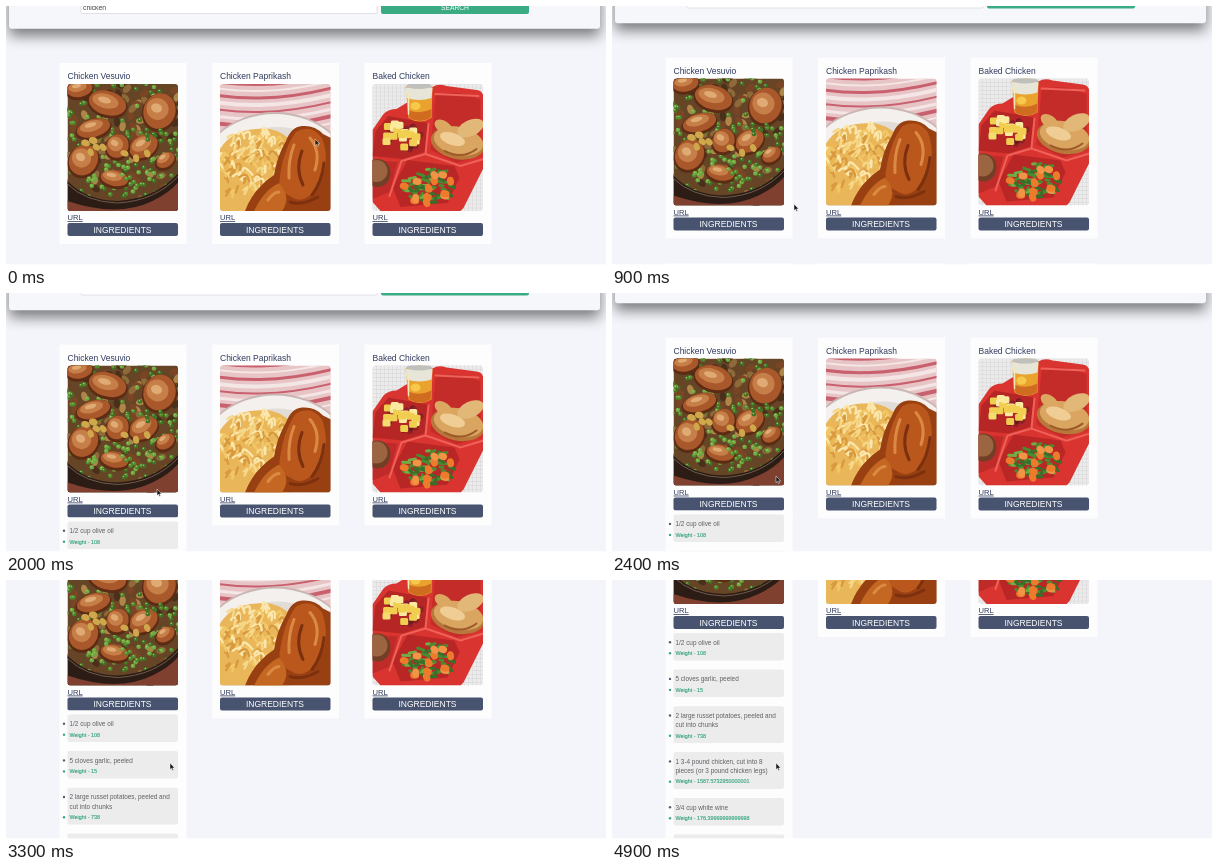
An HTML page that plays this animation: 600x259 px, repeating every 5200 ms.

```html
<!DOCTYPE html>
<html lang="en">
<head>
<meta charset="utf-8">
<title>Recipe search</title>
<style>
  html, body { margin: 0; height: 100%; overflow: hidden; background: #f4f5fa; }
  svg { display: block; width: 100vw; height: 100vh; font-family: "Liberation Sans", Arial, sans-serif; }
</style>
</head>
<body>
<svg id="stage" viewBox="0 0 600 259" xmlns="http://www.w3.org/2000/svg"></svg>
<script>
let seed = 7;
const rnd = () => (seed = (seed * 16807) % 2147483647) / 2147483647;
const pick = list => list[Math.floor(rnd() * list.length)];

const rect = (x, y, w, h, fill, r = 0, more = "") =>
  `<rect x="${x}" y="${y}" width="${w}" height="${h}" rx="${r}" fill="${fill}" ${more}/>`;
const text = (x, y, s, size, fill, more = "") =>
  `<text x="${x}" y="${y}" font-size="${size}" fill="${fill}" ${more}>${s}</text>`;
const path = (d, fill, more = "") => `<path d="${d}" fill="${fill}" ${more}/>`;
const line = (d, color, width) => path(d, "none", `stroke="${color}" stroke-width="${width}" stroke-linecap="round"`);
const oval = (x, y, rx, ry, fill, turn = 0) =>
  `<ellipse rx="${rx}" ry="${ry}" fill="${fill}" transform="translate(${x} ${y}) rotate(${turn})"/>`;

// n shapes spread at random over an ellipse
function scatter(n, cx, cy, rx, ry, shape) {
  let out = "";
  while (n--) {
    const a = rnd() * 2 * Math.PI, d = Math.sqrt(rnd());
    out += shape((cx + rx * d * Math.cos(a)).toFixed(1), (cy + ry * d * Math.sin(a)).toFixed(1));
  }
  return out;
}

const pea = (x, y) => oval(x, y, 2.3, 2.2, pick(["#4f8a2b", "#6fa83e", "#3f7223"])) + oval(x - .6, y - .7, .8, .7, "#a3cc72");
const meat = ([x, y, rx, ry, turn]) =>
  oval(x, y + 1.5, rx + 1.5, ry + 1.5, "#5b2b14", turn) + oval(x, y, rx, ry, "#a9582b", turn) +
  oval(x - 2, y - 2, rx * .7, ry * .6, "#c67f48", turn) + oval(x - 3, y - 3, rx * .35, ry * .25, "#e0aa74", turn);

function skillet() {
  const pieces = [[40, 19, 19, 12, 15], [92, 27, 16, 18, 20], [26, 44, 17, 9, -15], [16, 76, 14, 16, 35],
    [76, 62, 15, 11, -30], [50, 62, 11, 12, 30], [12, 5, 13, 8, -10], [47, 94, 14, 8, 10], [98, 76, 10, 7, -35]];
  return rect(0, 0, 111, 127, "#664526") +
    scatter(110, 55, 55, 75, 78, (x, y) => oval(x, y, 5, 3.2, pick(["#8e6a3a", "#ad8648", "#49301b", "#7a4524"]), rnd() * 180)) +
    scatter(170, 55, 56, 66, 66, pea) +
    pieces.map(meat).join("") +
    scatter(10, 45, 66, 38, 12, (x, y) => oval(x, y, 4, 3, "#d0a84c", rnd() * 90)) +
    scatter(18, 60, 92, 40, 10, pea) + scatter(9, 88, 50, 15, 7, pea) +
    path("M0 97Q18 116 50 117Q88 115 111 89V127H0Z", "#2b1c16") +
    path("M0 117Q50 134 85 117Q102 109 111 98V127H0Z", "#80402f") +
    line("M0 100Q18 118 50 119Q88 117 111 92", "#8f7461", .7);
}

function noodles() {
  let out = rect(0, 0, 111, 127, "#e7c4c6");
  for (let i = 0; i < 10; i++)
    out += line(`M-5 ${i * 7 - 17}Q50 ${i * 7 - 8} 116 ${i * 7 - 25}`, i % 2 ? "#f4e6e4" : "#c9606d", i % 3 + 2);
  out += oval(55, 102, 82, 74, "#c9b5b2") + oval(55, 103, 81, 73, "#f3f0ed") + oval(57, 107, 68, 64, "#e2dcd6") +
    path("M0 65Q12 46 36 45Q58 42 72 58V127H0Z", "#e9b75a");
  out += scatter(110, 32, 82, 38, 38, (x, y) =>
    line(`M${x} ${y}q${(rnd() * 10).toFixed(1)} -7 ${(rnd() * 12 - 2).toFixed(1)} 4`, pick(["#f6d88a", "#d99a3d", "#f1c768", "#fbe6ac"]), 2.4));
  return out + path("M25 127Q33 105 54 91Q57 72 66 57Q71 43 82 42Q95 41 103 50L111 54V127Z", "#984012") +
    path("M60 92Q64 64 76 48Q91 39 102 54Q111 78 99 101Q84 123 70 112Q57 106 60 92Z", "#b9571d") +
    path("M34 127Q44 106 59 99Q72 113 62 127Z", "#c46723") +
    line("M74 61Q68 76 69 94M90 54Q101 67 95 86M48 116Q54 108 59 108", "#db8a43", 3) +
    line("M82 67Q75 85 83 101M104 79Q102 98 92 111M70 118Q82 122 98 113", "#7d300e", 3);
}

function tray() {
  let out = rect(0, 0, 111, 127, "#eceaea");
  for (let i = 0; i < 130; i += 4) out += line(`M0 ${i}H111M${i} 0V127`, "#d9d8da", .6);
  out += path("M0 46L11 30Q16 25 24 25L60 3Q66 -1 74 2L104 6Q111 7 111 14V84L91 124L88 127H8L0 118Z", "#d9342f") +
    path("M3 47L16 32L55 39L52 68L30 75L0 72Z", "#b52624") +
    path("M63 12Q84 4 108 16V72L84 79L58 66Z", "#c42c29") +
    path("M35 76L82 82L87 94L75 119L28 123L20 103Z", "#b82725") +
    path("M0 76L25 78L17 108L0 115Z", "#bf2b29") +
    line("M56 40L53 70L29 77L17 112M53 70L88 82L111 75M63 10L106 12", "#ee625a", 2);
  out += path("M33 3Q47 -4 60 3L59 34Q47 41 36 34Z", "#e9a22e") + path("M33 4Q47 -2 60 4L59 14Q47 18 34 14Z", "#e6e5d8") +
    oval(46.5, 2, 13, 3, "#bfc0bc") + path("M36 26Q47 31 59 25L58 34Q47 40 37 34Z", "#d06c20") +
    oval(43, 22, 5, 4, "#f6c94b") + line("M36 8V30", "#f5e7b6", 1.5);
  out += scatter(20, 28, 54, 22, 14, (x, y) => oval(x, y, 3, 3, pick(["#6b1821", "#8f2027"]))) +
    scatter(18, 27, 53, 23, 13, (x, y) => rect(x - 4, y - 4, 8, 7, pick(["#f5dc70", "#f1ce4f", "#faeaa0"]), 1.5));
  out += oval(85, 59, 27, 16, "#b9783b", 12) + oval(86, 57, 25, 14, "#d9a561", 12) + oval(98, 44, 14, 8, "#e2b878", -25) +
    oval(71, 43, 10, 6, "#dca760", 35) + oval(80, 55, 13, 6, "#efcd95", 18) + line("M72 67Q90 76 104 65", "#9d5b2a", 2);
  out += oval(5, 89, 13, 14, "#713f26") + oval(4, 87, 11, 11, "#9b6541");
  return out +
    scatter(60, 56, 101, 27, 17, (x, y) => line(`M${x} ${y}l${(rnd() * 8).toFixed(1)} ${(rnd() * 5 - 2).toFixed(1)}`, pick(["#4c8a2f", "#70ad43", "#37702a"]), 3)) +
    scatter(13, 53, 103, 27, 17, (x, y) => oval(x, y, 4.5, 3.5, pick(["#ee7a2c", "#f29445"]), rnd() * 90));
}

const navy = "#2f3a5c", slate = "#47536f", green = "#38a583", card = "#fdfdfe";
const columns = [53.5, 206, 358.5];

const recipe = (x, title, photo) =>
  rect(x, 57, 127, 181, card, 1) + text(x + 8, 73, title, 8.5, navy) +
  `<g transform="translate(${x + 8} 78)" clip-path="url(#photo)">${photo}</g>` +
  text(x + 8, 214, "URL", 7.6, navy, 'text-decoration="underline"') +
  rect(x + 8, 217, 110.5, 13, slate, 2) + text(x + 63, 226.7, "INGREDIENTS", 8.5, "#fff", 'text-anchor="middle"');

function ingredients() {
  const items = [
    ["108", "1/2 cup olive oil"], ["15", "5 cloves garlic, peeled"],
    ["738", "2 large russet potatoes, peeled and", "cut into chunks"],
    ["1587.5732950000001", "1 3-4 pound chicken, cut into 8", "pieces (or 3 pound chicken legs)"],
    ["176.39999999999998", "3/4 cup white wine"], ["180", "3/4 cup chicken stock"]];
  let y = 234, out = rect(53.5, 230, 127, 300, card);
  for (const [weight, ...lines] of items) {
    const extra = (lines.length - 1) * 9.3;
    out += rect(61.5, y, 110.5, 27.5 + extra, "#ececec", 2) + oval(58, y + 9.3, 1.2, 1.2, "#555d70") +
      lines.map((s, i) => text(63.5, y + 11.5 + i * 9.3, s, 6.4, "#5d6064")).join("") +
      oval(58, y + 20.3 + extra, 1.2, 1.2, green) +
      text(63.5, y + 22 + extra, "Weight - " + weight, 5.4, green, `stroke="${green}" stroke-width=".15"`);
    y += 36.6 + extra;
  }
  return out;
}

const stage = document.getElementById("stage");
stage.innerHTML = `
  <defs>
    <clipPath id="photo">${rect(0, 0, 110.5, 127, "#000", 3)}</clipPath>
    <filter id="blur" x="-20%" y="-50%" width="140%" height="200%"><feGaussianBlur stdDeviation="7"/></filter>
  </defs>
  ${rect(0, 0, 600, 259, "#f4f5fa")}
  <g id="page">
    ${rect(3, -60, 591, 90, "#000", 3, 'opacity=".5" filter="url(#blur)"')}
    ${rect(3, -60, 591, 82.7, "#f6f7fb", 3)}
    ${rect(75, -8, 296, 15.5, "#fff", 1, 'stroke="#d5d7dd" stroke-width=".7"')}
    ${text(77, 4, "chicken", 6.8, "#444")}
    ${rect(375, -8, 148, 16, "#3bab84", 2)}
    ${text(449, 4, "SEARCH", 6.7, "#fff", 'text-anchor="middle"')}
    ${recipe(columns[0], "Chicken Vesuvio", skillet())}
    ${recipe(columns[1], "Chicken Paprikash", noodles())}
    ${recipe(columns[2], "Baked Chicken", tray())}
    <g id="next">${columns.map(x => rect(x, 263, 127, 181, card, 1)).join("")}</g>
    <g id="list">${ingredients()}</g>
  </g>
  ${rect(0, 258.3, 600, .7, "#fff")}
  <g id="arrow">${path("M0 0V6.6L1.5 5.3L2.5 7.6L3.6 7.1L2.6 4.9H4.6Z", "#111", 'stroke="#fff" stroke-width=".5"')}</g>
  <g id="hand">${path("M-1 -3.5Q0 -4.5 .8 -3.5V-1L3 0V2.5L2 4H-1.4L-3 1L-1 1Z", "#fff", 'stroke="#333" stroke-width=".6"')}</g>`;

// time, scroll, pointer x, pointer y
const steps = [
  [0, 0, 309, 133], [300, 1.5, 309, 133], [400, 4, 309, 133], [500, 5.5, 309, 133],
  [700, 5.5, 283, 148], [800, 5.5, 232, 175], [900, 5.5, 182, 198],
  [1100, 5.5, 148, 210], [1200, 5.5, 128, 217], [1300, 5.5, 122, 218],
  [1800, 5.5, 126, 216], [1900, 5.5, 138, 207], [2000, 5.5, 151, 196], [2100, 5.5, 160, 188], [2200, 5.5, 164, 183],
  [2300, 8, 164, 183], [2400, 12.4, 164, 183], [2500, 28, 164, 183], [2700, 60, 164, 183],
  [3000, 84, 164, 183], [3300, 99.5, 164, 183], [3700, 118, 164, 183], [4000, 132.5, 164, 183], [4900, 181, 164, 183]];

const [page, next, list, arrow, hand] = ["page", "next", "list", "arrow", "hand"].map(id => document.getElementById(id));
const show = (el, on) => el.setAttribute("visibility", on ? "visible" : "hidden");
const move = (el, x, y) => el.setAttribute("transform", `translate(${x} ${y})`);

function draw(now) {
  const t = now % 5200;
  const [, scroll, x, y] = steps.findLast(s => s[0] <= t);
  const open = t >= 1700, pointing = t >= 1200 && t < 1900;
  move(page, 0, -scroll);
  move(arrow, x, y);
  move(hand, x, y);
  show(list, open);
  show(next, !open);
  show(hand, pointing);
  show(arrow, !pointing);
}

const start = performance.now();
function tick() {
  draw(performance.now() - start);
  requestAnimationFrame(tick);
}
tick();
</script>
</body>
</html>
```
